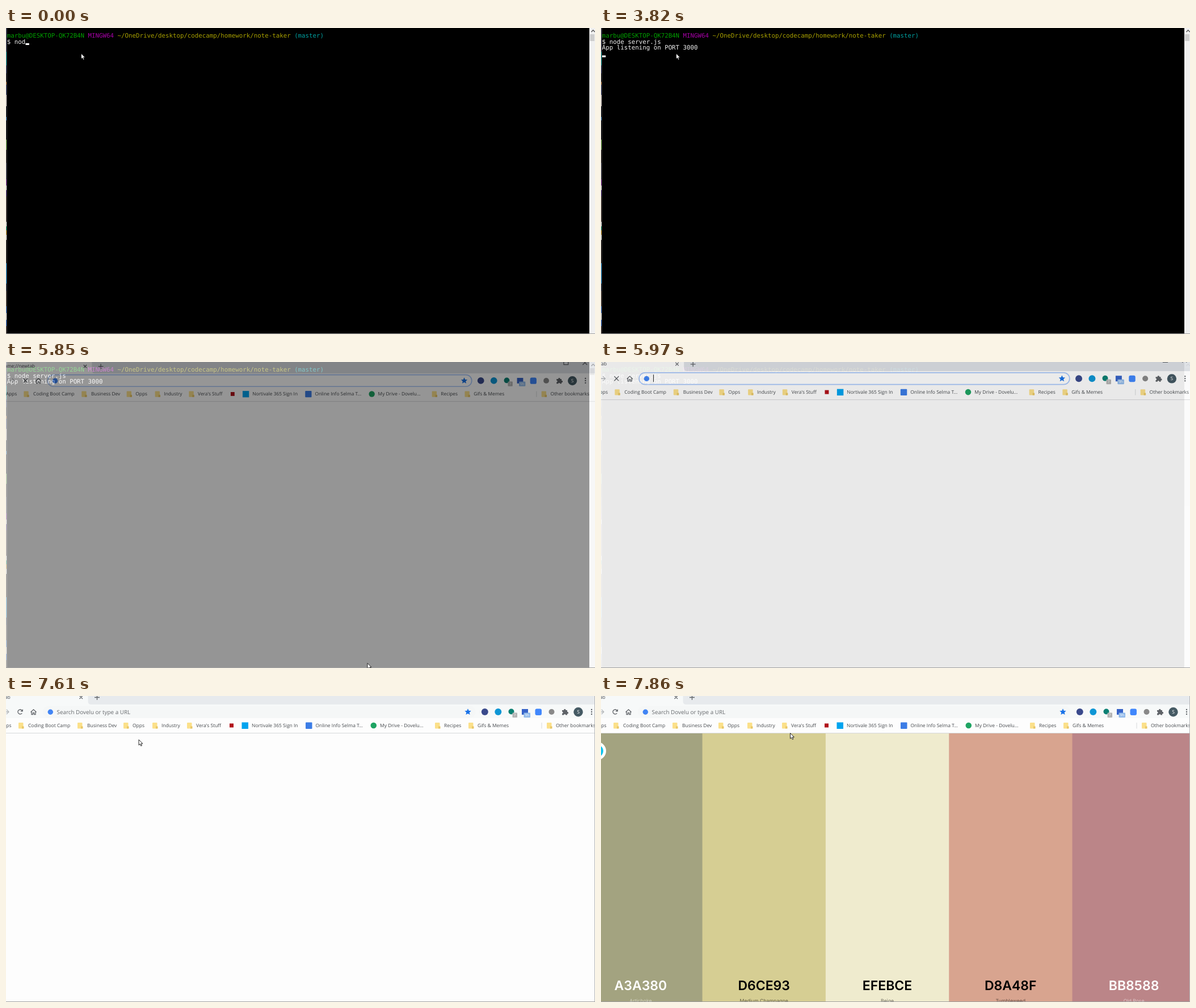
An HTML page for the animation above (8000 ms loop, 1038x540 px).

```html
<!DOCTYPE html>
<html lang="en">
<head>
<meta charset="utf-8">
<title>Starting the note server</title>
<style>
  html, body { margin: 0; width: 100%; height: 100%; overflow: hidden; background: #000; }
  svg { display: block; width: 1038px; height: 540px; }
  text { text-rendering: geometricPrecision; white-space: pre; }
  #term text { font: 10.79px 'DejaVu Sans Mono', monospace; fill: #f0f0f0; }
  #browser text { font-family: 'Open Sans', 'Noto Sans', sans-serif; font-size: 8.5px; fill: #45494d; }
  #browser #hint { font-size: 9.87px; fill: #66696d; }
  #browser .badge { font-size: 6.5px; fill: #fff; text-anchor: middle; }
  #palette text { font-family: Inter, sans-serif; text-anchor: middle; }
  #browser #palette .hex { font-size: 23px; font-weight: 600; }
  #browser #palette .name { font-size: 8.7px; opacity: .55; }
  .line { fill: none; stroke: #5f6368; stroke-width: 1.3; }
</style>
</head>
<body>
<svg viewBox="0 0 1038 540">
  <g id="term">
    <rect width="1038" height="540"/>
    <g id="strip"></g>
    <path d="M1.500 0V540" stroke="#3c3c3c"/>
    <text x="1.8" y="17"><tspan fill="#00a000">marbu@DESKTOP-QK72B4N</tspan> <tspan fill="#a800a8">MINGW64</tspan> <tspan fill="#a8a000">~/OneDrive/desktop/codecamp/homework/note-taker</tspan> <tspan fill="#00a0a0">(master)</tspan></text>
    <text id="cmd" x="1.8" y="27.5"></text>
    <text id="reply" x="1.8" y="38">App listening on PORT 3000</text>
    <rect id="block" width="6.3" height="3.2" fill="#fff"/>
    <rect x="1028" width="10" height="540" fill="#f0f0f0"/>
    <rect x="1029" y="11" width="8" height="12" fill="#cdcdcd"/>
    <path d="M1031.5 7l3.2-3.3 3.2 3.3" fill="none" stroke="#505050" stroke-width="1.3"/>
  </g>

  <g id="browser">
    <rect x="-40" y="-30" width="1120" height="610" fill="#fdfdfd"/>
    <rect id="tabs" x="-40" y="-30" width="1120" height="45"/>
    <path id="tab" d="M-40-20H137Q144.500-20 144.500-12V9Q144.500 15 150 15H1080V39H-40z"/>
    <text id="title" x="-26" y="5"></text>
    <path class="line" d="M129.500-.500l5.500 5.500m0-5.500l-5.500 5.500M156 2.500h9m-4.500-4.500v9"/>
    <path class="line" d="M993-8.500h8v7.500h-8zM1027-8.500l8 8m0-8l-8 8" stroke-width="1"/>
    <path class="line" d="M-4 28h9m-4-4l4 4-4 4" style="stroke:#b5b8bb"/>
    <path id="stop" class="line" d="M21 24l8 8m0-8l-8 8"/>
    <g id="reload">
      <path class="line" d="M28.200 30.300A4 4 0 1 1 27.800 25.200"/>
      <path d="M29.800 23v4.400h-4.400z" fill="#5f6368"/>
    </g>
    <path class="line" d="M43.500 28.500l5-4.700 5 4.700m-8.500-1v5.200h2.400v-3h2.200v3h2.400v-5.200"/>
    <rect id="omni" x="65" y="17.500" width="762.500" height="21" rx="10.500" stroke-width="1.700"/>
    <circle cx="78.300" cy="28.200" r="4.700" fill="#4285f4"/>
    <text id="hint" x="89.500" y="32">Search Dovelu or type a URL</text>
    <path id="caret" d="M90.500 21v13" stroke="#222" stroke-width="1"/>
    <path d="M814 22.200l1.700 3.700 4 .4-3 2.700.9 4-3.600-2.100-3.600 2.100.9-4-3-2.700 4-.4z" fill="#1a73e8"/>
    <circle cx="843.800" cy="28" r="6" fill="#3a4a8c"/>
    <circle cx="867.300" cy="28" r="6" fill="#0e96d5"/>
    <circle cx="890.500" cy="27.500" r="5" fill="#0b8073"/>
    <rect x="892.500" y="29.500" width="8.500" height="8.500" rx="1" fill="#b4b4b4"/>
    <text class="badge" x="896.700" y="36">?</text>
    <rect x="909" y="23" width="11" height="10" fill="#3763c8"/>
    <rect x="912.500" y="29.500" width="11.500" height="8.500" rx="1" fill="#8fb9ea"/>
    <text class="badge" x="918.300" y="36">9h</text>
    <rect x="932.500" y="22.500" width="11.500" height="11.500" rx="3" fill="#4087fc"/>
    <circle cx="961.500" cy="28" r="5" fill="#898989"/>
    <path d="M980 25h3.200a1.700 1.700 0 1 1 3.300 0h2.500v3a1.700 1.700 0 1 1 0 3.300v2.200h-2.700a1.600 1.600 0 0 0-3.200 0H980v-2.700a1.600 1.600 0 0 0 0-3.200z" fill="#5f6368"/>
    <circle cx="1008.500" cy="28.200" r="8.200" fill="#455a64"/>
    <text x="1008.500" y="31.200" text-anchor="middle" style="fill:#fff">S</text>
    <g fill="#5f6368"><circle cx="1032" cy="24" r="1.200"/><circle cx="1032" cy="28" r="1.200"/><circle cx="1032" cy="32" r="1.200"/></g>
    <text x="-10.300" y="55">Apps</text>
    <g id="marks"></g>
    <rect x="394" y="48.500" width="7" height="7" fill="#b1121b"/>
    <rect x="415.500" y="46.500" width="11.500" height="11.500" fill="#00a4ef"/>
    <rect x="528" y="46.500" width="11.500" height="11.500" rx="1" fill="#3c7de6"/>
    <circle cx="647.800" cy="52" r="5.300" fill="#1fa463"/>
    <path d="M944 47v10.500M-40 65.500H1080" stroke="#d6d8da"/>
    <g id="palette">
      <g id="bars"></g>
      <circle cx="-7" cy="97" r="16" fill="#fff"/>
      <circle cx="-7" cy="97" r="11" fill="#12c4ee"/>
    </g>
  </g>
  <path id="edge" d="M1037.500 0V540" stroke="#b4b6b8"/>
  <path d="M0 539.500H1038" stroke="#a0a0a0"/>
  <path id="mouse" d="M.500.500v9.700l2.200-2 1.600 3.500 1.600-.7-1.500-3.400h3z" fill="#fff" stroke="#111" stroke-width=".9"/>
</svg>

<script>
const LOOP = 8000;
const ADVANCE = 6.5;
const $ = id => document.getElementById(id);

function add(parent, tag, attrs, label = '') {
  const el = document.createElementNS('http://www.w3.org/2000/svg', tag);
  for (const key in attrs) el.setAttribute(key, attrs[key]);
  el.textContent = label;
  parent.append(el);
}

// Sliver of desktop left of the terminal: top and colour
const sliver = [
  [0, '#3c3f5c'], [42, '#0a9c9c'], [66, '#2d3560'], [80, '#15161c'], [95, '#b87333'],
  [100, '#3b4470'], [118, '#cfc4c0'], [138, '#10131c'], [157, '#2f7fc4'], [163, '#0b0b10'],
  [197, '#6fae45'], [215, '#2b2420'], [238, '#484858'], [267, '#8a2fa0'], [278, '#ddd'],
  [286, '#4b2b7c'], [297, '#50403c'], [342, '#e6e6e6'], [350, '#17a673'], [357, '#d39a1e'],
  [365, '#ddd'], [374, '#231c18'], [415, '#1c96dc'], [451, '#22314a'], [464, '#54443c'],
  [491, '#3777d0'], [503, '#e4e4e4'], [515, '#2f6cd0'], [526, '#4a3c38']
];
sliver.forEach(([y, fill], i) => {
  const end = i + 1 < sliver.length ? sliver[i + 1][0] : 540;
  add($('strip'), 'rect', { y, width: 1, height: end - y, fill });
});

// Label position, label, folder position (if any)
[
  [39, 'Coding Boot Camp', 22], [143, 'Business Dev', 126], [223, 'Opps', 207],
  [274, 'Industry', 258], [335, "Vera's Stuff", 319], [433, 'Nortivale 365 Sign In'],
  [545.5, 'Online Info Selma T...'], [659, 'My Drive - Dovelu...'],
  [772, 'Recipes', 756], [831, 'Gifs & Memes', 815], [969, 'Other bookmarks', 953]
].forEach(([x, label, folder]) => {
  add($('marks'), 'text', { x, y: 55 }, label);
  if (folder === undefined) return;
  add($('marks'), 'rect', { x: folder, y: 47, width: 8.5, height: 10.5, rx: 1, fill: '#fbe08a' });
  add($('marks'), 'rect', { x: folder + 6, y: 53.5, width: 3.5, height: 4, fill: '#e9c766' });
});

[
  ['A3A380', 'Artichoke', '#fff'], ['D6CE93', 'Medium Champagne', '#000'],
  ['EFEBCE', 'Beige', '#000'], ['D8A48F', 'Tumbleweed', '#000'], ['BB8588', 'Old Rose', '#fff']
].forEach(([hex, name, ink], i) => {
  const left = -38.7 + i * 217.3, mid = left + 108.6, style = 'fill:' + ink;
  add($('bars'), 'rect', { x: left, y: 66, width: 217.8, height: 520, fill: '#' + hex });
  add($('bars'), 'text', { class: 'hex', x: mid, y: 519, style }, hex);
  add($('bars'), 'text', { class: 'name', x: mid, y: 541, style }, name);
});

// Tracks: start time, then the values held until the next entry
const typed = [[0, 5], [120, 6], [270, 7], [390, 8], [540, 10], [830, 11], [1100, 13], [1370, 14], [1500, 15], [1640, 16]];
const blink = [[0, 1], [3260, 0], [3820, 1], [4370, 0], [4910, 1], [5300, 0]];
const opening = [[0, 0, 1], [5850, .59, .98], [5970, .92, .995], [6090, 1, 1]];
const pointer = [
  [0, 132, 44.5], [3970, 195, 140], [4090, 280, 268], [4240, 352, 405], [4370, 394, 476],
  [4490, 407, 507], [4640, 412, 519], [4770], [5030, 350, 455], [5150, 351, 453], [5300],
  [5850, 636.5, 531], [5970], [6370, 554, 450], [6640], [7340, 598, 477], [7470, 420, 285],
  [7610, 233.5, 76.5], [7730, 288, 71], [7860, 333, 65]
];

const at = (track, t) => track.findLast(entry => entry[0] <= t).slice(1);
const show = (id, on) => $(id).setAttribute('visibility', on ? 'inherit' : 'hidden');
const paint = (id, fill) => $(id).setAttribute('fill', fill);

function draw(now) {
  const t = now % LOOP;

  const [count] = at(typed, t);
  $('cmd').textContent = '$ node server.js'.slice(0, count);
  show('reply', t >= 2580);
  show('block', at(blink, t)[0]);
  $('block').setAttribute('x', t < 2040 ? 2 + count * ADVANCE : 2);
  $('block').setAttribute('y', t < 2040 ? 26.8 : t < 2580 ? 37.8 : 48.4);

  const [alpha, scale] = at(opening, t);
  $('browser').setAttribute('opacity', alpha);
  $('browser').setAttribute('transform', `translate(490 275) scale(${scale}) translate(-490 -275)`);
  show('browser', alpha > 0);
  show('edge', alpha === 1);

  const focused = t < 6780;
  $('title').textContent = t < 5970 ? 'chrome://newtab' : 'New Tab';
  paint('tabs', focused ? '#dee1e6' : '#e7eaed');
  paint('tab', focused ? '#fdfdfd' : '#f7f9f9');
  paint('omni', focused ? '#fff' : '#f5f7f7');
  $('omni').setAttribute('stroke', focused ? '#a8c7fa' : 'none');
  show('caret', t >= 5970 && t < 6500);
  show('hint', !focused);
  show('stop', t < 7340);
  show('reload', t >= 7340);
  show('palette', t >= 7860);

  const [x, y] = at(pointer, t);
  show('mouse', x !== undefined);
  if (x !== undefined) $('mouse').setAttribute('transform', `translate(${x} ${y})`);

  requestAnimationFrame(tick);
}

const start = performance.now();
const tick = () => draw(performance.now() - start);
tick();
</script>
</body>
</html>
```
